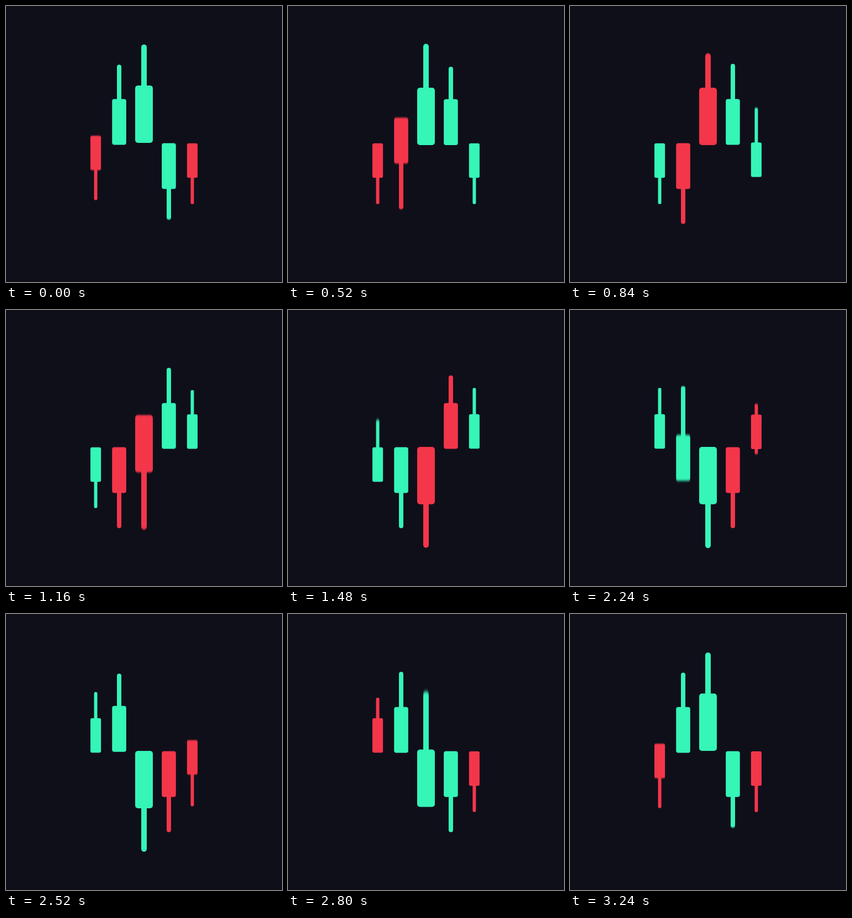
Recreate the animation shown at these times as an HTML page. Size 500x500 px, loop 3280 ms.

```html
<!DOCTYPE html>
<html lang="en">
<head>
<meta charset="utf-8">
<title>Candlestick loader</title>
<style>
  html, body { margin: 0; width: 100%; height: 100%; overflow: hidden; background: #0f0f1a; }
  svg { display: block; width: 100%; height: 100%; }
</style>
</head>
<body>
<svg id="stage" viewBox="0 0 500 500"></svg>
<script>
const GREEN = '#35f5b7', RED = '#f4364a';
const LOOP = 3280, STEP = 40, CYCLE = 3240, STAGGER = 640, SHUTTER = 20;
const MIDDLE = 250, COUNT = 5;
const RED_FROM = 100, RED_UNTIL = 1420;

// Sizes and reach (distance from the middle line) at full scale.
const BODY = {
  width: 32, height: 104, reach: 50,
  down: { start: 280, length: 520, ease: bezier(0.38, 0, 0.65, 1) },
  up: { start: 2120, length: 600, ease: bezier(0.3, 0, 0.2, 1.28) }
};
const WICK = {
  width: 10, height: 153, reach: 105,
  down: { start: -120, length: 1040, ease: bezier(0.8, 0, 0.2, 1) },
  up: { start: 1840, length: 860, ease: bezier(0.45, 0, 0.05, 1) }
};

const svg = document.getElementById('stage');
const candles = Array.from({ length: COUNT }, (_, i) => {
  const side = i - (COUNT - 1) / 2, rank = Math.abs(side);
  const x = MIDDLE + side * (46.25 - 1.25 * rank);
  const scale = 1 - 0.2 * rank;
  return {
    delay: STAGGER * (i - 1),
    bars: [makeBar('wick' + i, WICK, x, scale), makeBar('body' + i, BODY, x, scale)]
  };
});

function bezier(x1, y1, x2, y2) {
  const at = (s, a, b) => 3 * s * (1 - s) ** 2 * a + 3 * s * s * (1 - s) * b + s ** 3;
  return x => {
    if (x <= 0) return 0;
    if (x >= 1) return 1;
    let low = 0, high = 1;
    for (let i = 0; i < 24; i++) {
      const mid = (low + high) / 2;
      if (at(mid, x1, x2) < x) low = mid;
      else high = mid;
    }
    return at(low, y1, y2);
  };
}

function wrap(phase) {
  return ((phase % CYCLE) + CYCLE) % CYCLE;
}

function progress(phase, { start, length, ease }) {
  return ease((phase - start) / length);
}

function offset({ reach, down, up }, phase) {
  // Measured from the start of the downward move, which may precede phase 0.
  const p = wrap(phase - down.start) + down.start;
  return reach * (2 * (progress(p, down) - progress(p, up)) - 1);
}

function add(parent, tag, attrs) {
  const node = document.createElementNS('http://www.w3.org/2000/svg', tag);
  for (const name in attrs) node.setAttribute(name, attrs[name]);
  return parent.appendChild(node);
}

function makeBar(id, kind, x, scale) {
  const filter = add(svg, 'filter', {
    id, x: '-20%', y: '-20%', width: '140%', height: '140%',
    'color-interpolation-filters': 'sRGB'
  });
  const blur = add(filter, 'feGaussianBlur', { stdDeviation: '0 0' });
  const width = kind.width * scale, height = kind.height * scale;
  const rect = add(svg, 'rect', { x: x - width / 2, width, height, rx: 5 * scale });
  return { id, kind, scale, height, rect, blur };
}

function placeBar({ id, kind, scale, height, rect, blur }, phase, color) {
  const y = MIDDLE + offset(kind, phase) * scale - height / 2;
  const half = SHUTTER / 2;
  const travel = Math.abs(offset(kind, phase + half) - offset(kind, phase - half)) * scale;
  const spread = travel / Math.sqrt(12);
  rect.setAttribute('y', y.toFixed(2));
  rect.setAttribute('fill', color);
  blur.setAttribute('stdDeviation', '0 ' + spread.toFixed(2));
  if (spread > 0.25) rect.setAttribute('filter', `url(#${id})`);
  else rect.removeAttribute('filter');
}

function draw(ms) {
  const time = Math.floor((ms % LOOP) / STEP) * STEP;
  for (const { delay, bars } of candles) {
    const phase = wrap(time - delay);
    const color = phase >= RED_FROM && phase < RED_UNTIL ? RED : GREEN;
    for (const bar of bars) placeBar(bar, phase, color);
  }
}

const start = performance.now();
function tick() {
  draw(performance.now() - start);
  requestAnimationFrame(tick);
}
tick();
</script>
</body>
</html>
```
